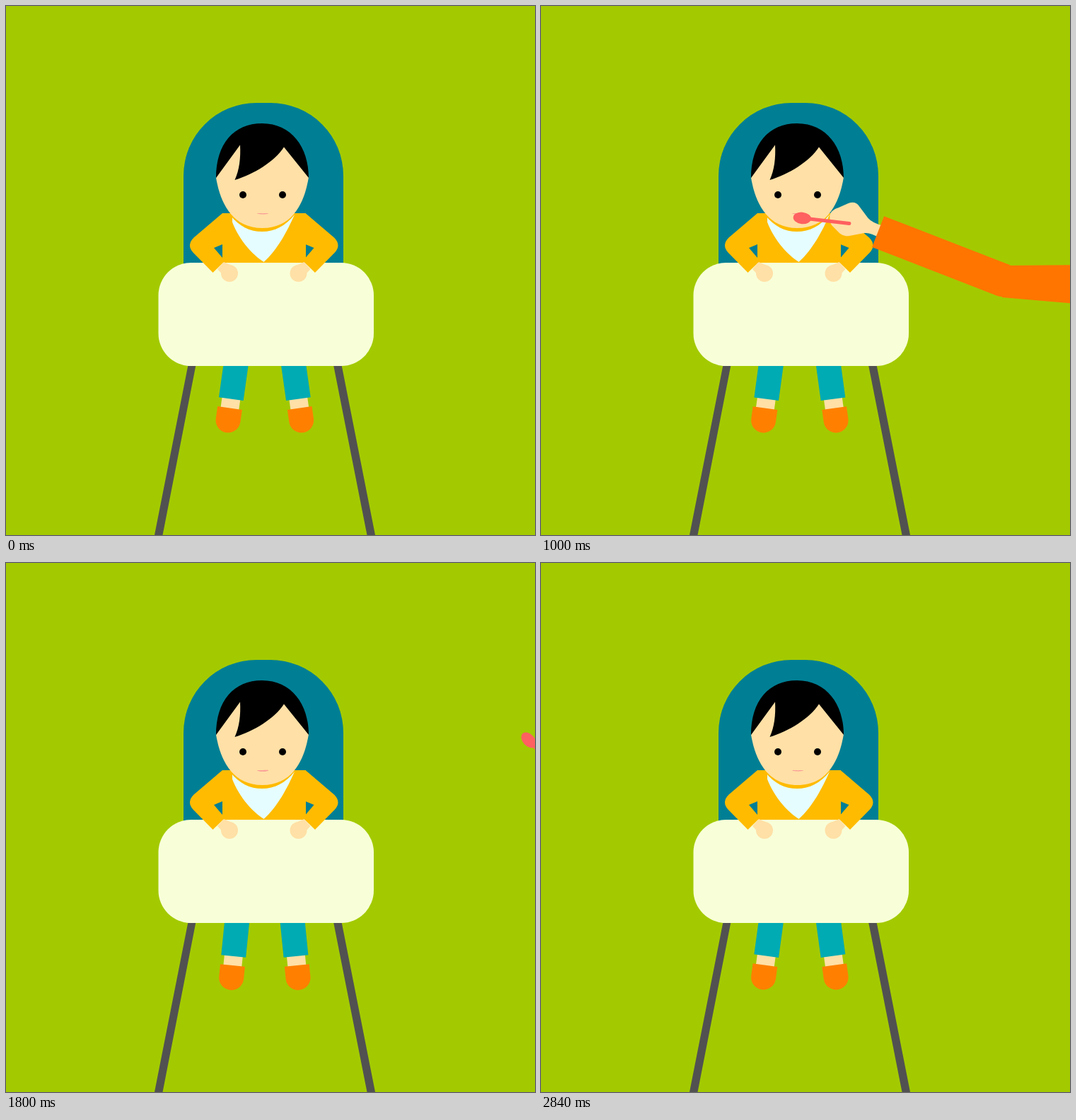
These frames come from a looping animation (748 by 748 pixels, 2880 ms). An HTML page:

```html
<!DOCTYPE html>
<html lang="en">
<head>
<meta charset="utf-8">
<title>Feeding time</title>
<style>
  html, body { margin: 0; height: 100%; overflow: hidden; background: #a3ca00; }
  svg { display: block; width: 100vw; height: 100vh; }
  .skin { fill: #ffe0a6; }
  .shirt { fill: #fb0; }
  .sleeve { fill: #ff7500; }
  .spoon { fill: #ff6060; }
</style>
</head>
<body>
<svg viewBox="0 0 748 748">
  <defs>
    <g id="leg">
      <rect class="skin" x="-13" y="80" width="26" height="22"/>
      <rect fill="#00abb3" x="-17.5" y="0" width="35" height="85.5"/>
      <path fill="#ff8000" d="M-17.5 98.5h35v17.5a17.5 17.5 0 0 1-35 0z"/>
    </g>
    <g id="arm">
      <path class="shirt" d="M306 293L265.500 327.500Q255 338 264.500 348.500L292.500 377L308 362L306 356L294 342L306 337L320 330V293z"/>
      <path class="skin" d="M299 372L308 362L322 368L310 384z"/>
      <circle class="skin" cx="316" cy="378" r="12"/>
    </g>
  </defs>

  <!-- chair and legs -->
  <rect x="251" y="137" width="226" height="350" rx="103" fill="#007f94"/>
  <path fill="#515151" d="M258 505h11L221.500 748h-11.500zM462.500 505h11.500L522 748h-11.500z"/>
  <use href="#leg" id="legL"/>
  <use href="#leg" id="legR"/>

  <!-- body, tray and arms -->
  <path class="shirt" d="M306 293H424V370H306z"/>
  <path fill="#e6fdff" d="M316.500 295C330 312 345 319 362 319C380 319 395 311 408 295C398 318 383 346 364.500 362C342 347 324 322 316.500 295z"/>
  <rect x="215.500" y="363" width="304.500" height="146" rx="46" fill="#f8ffd8"/>
  <use href="#arm"/>
  <use href="#arm" transform="matrix(-1 0 0 1 729.500 0)"/>

  <!-- head -->
  <path class="skin" d="M297 243L331 190L393 195L428 242C423 272 409 314 362.500 314C316 314 302 272 297 243z"/>
  <path d="M297 243C297 195 322 166 362 166C404 166 428 200 428 243L393 199.500C380 220 350 238 323.500 246C330 232 332 215 331 196.500z"/>
  <circle cx="335" cy="267" r="5"/>
  <circle cx="391" cy="267" r="5"/>
  <path id="mouth" fill="#fa9c98" d="M-9-3C-7-5.500-3-5 0-4C3-5 8-6 9-3.500C8 3.500 3 6.500-.5 6.500C-5 6.500-8 2.500-9-3z"/>

  <!-- feeding arm -->
  <g id="hand">
    <path class="skin" transform="rotate(-6) translate(-369 -301)"
      d="M408 300C407 292 414 288 420 286L434 279.500C440 277 446 278 449 283L462 300Q468 307 484 311L478 328Q465 320 457 321.500L436 325.500C430 327 424 324 421 321L411 311Q408 307 408 300z"/>
    <path d="M8 0H67" stroke="#ff6060" stroke-width="5" stroke-linecap="round"/>
    <ellipse class="spoon" rx="12.700" ry="8.300"/>
    <ellipse id="food" rx="8.700" ry="6" fill="#fff"/>
  </g>
  <path id="upper" class="sleeve" d="M0-20.500L500-44V48L0 24.500z"/>
  <g id="forearm" class="sleeve">
    <path d="M0-23.500H-189V23.500H0z"/>
    <circle r="23.500"/>
  </g>
</svg>
<script>
const LOOP = 2880, SWING = 480;
const FED = 930, HOLD = 30, TRAVEL = 840;
const FOREARM = 189, WRIST = [108.7, 7];

const $ = id => document.getElementById(id);
const clamp = (v, max = 1) => Math.min(max, Math.max(0, v));
const ease = v => (1 - Math.cos(Math.PI * clamp(v))) / 2;
const place = (id, x, y, angle) =>
  $(id).setAttribute('transform', `translate(${x} ${y}) rotate(${angle})`);
const polar = (x, y, degrees) => {
  const a = degrees * Math.PI / 180, c = Math.cos(a), s = Math.sin(a);
  return [x * c - y * s, x * s + y * c];
};

// pull is 0 with the spoon in the mouth and 1 as it crosses the stage edge.
function drawFeeder(t) {
  const pull = clamp((Math.abs(t - FED) - HOLD) / TRAVEL, 1.4);
  const [lift, drop] = t < FED ? [410, 498] : [484, 433];
  const x = 369 + 369 * pull ** 2.33;
  const y = 301 - lift * pull ** 2 + drop * pull ** 3;
  const spoon = 6 + 42 * pull ** 1.5;
  const fore = 21.2 + 24 * pull ** 2.26;
  const upper = 2.5 - 35 * pull ** 1.6;

  const [wx, wy] = polar(...WRIST, spoon);
  const [fx, fy] = polar(FOREARM, 0, fore);
  const elbow = [x + wx + fx, y + wy + fy];
  place('hand', x, y, spoon);
  place('forearm', ...elbow, fore);
  place('upper', ...elbow, upper);
  $('food').setAttribute('opacity', t < 760 ? 1 : 0);
}

function mouthOpening(t) {
  if (t < 1440) return ease(t / 440) * (1 - ease((t - 760) / 200));
  return 0.33 * Math.sin(Math.PI * (t - 1440) / SWING) ** 2;
}

function draw(t) {
  const angle = 8 * Math.cos(Math.PI * t / SWING);
  place('legL', 330.2, 471, angle);
  place('legR', 401.5, 471, -angle);
  const open = Math.max(0.12, mouthOpening(t));
  $('mouth').setAttribute('transform', `translate(363 293.7) scale(${0.9 + 0.1 * open} ${open})`);
  drawFeeder(t);
}

const start = performance.now();
function tick() {
  draw((performance.now() - start) % LOOP);
  requestAnimationFrame(tick);
}
tick();
</script>
</body>
</html>
```
